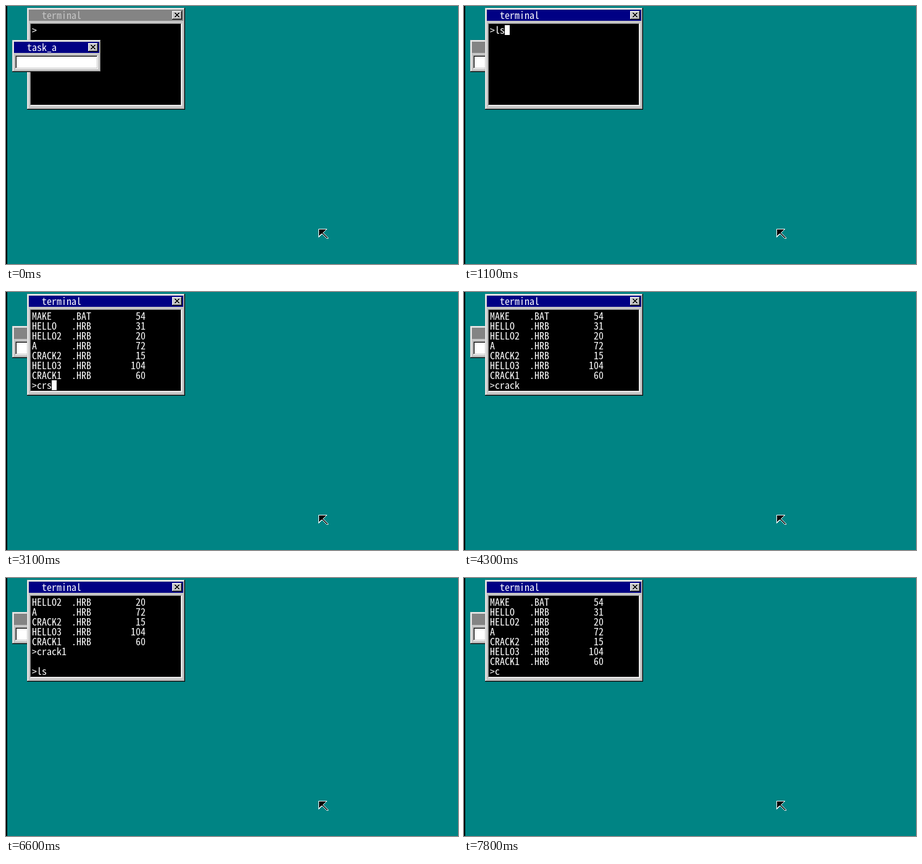
Animation of 732 by 418 pixels, one loop 8 s. Source, as an HTML page:

```html
<!DOCTYPE html>
<html lang="en">
<head>
<meta charset="utf-8">
<title>Terminal session</title>
<style>
  html, body { margin: 0; width: 100%; height: 100%; overflow: hidden; background: #008484; }
  svg { display: block; width: 732px; height: 418px; }
  text {
    font: 300 16px "Noto Sans Mono CJK JP", "Noto Sans Mono", "Liberation Mono", monospace;
    white-space: pre;
  }
</style>
</head>
<body>
<svg id="stage" viewBox="0 0 732 418" shape-rendering="crispEdges"></svg>
<script>
const NS = 'http://www.w3.org/2000/svg';
const LOOP = 8000;
const CELL = 8, LINE = 16, ROWS = 8;
const WHITE = '#fff', BLACK = '#000', LIGHT = '#c6c6c6', GREY = '#848484', NAVY = '#000084', TEAL = '#008484';
const stage = document.getElementById('stage');

function add(parent, tag, attrs) {
  const el = document.createElementNS(NS, tag);
  for (const key in attrs) el.setAttribute(key, attrs[key]);
  return parent.appendChild(el);
}

const rect = (parent, x, y, width, height, fill) => add(parent, 'rect', { x, y, width, height, fill });

// Puts every character on the fixed 8 px grid; y is the top of the line.
function write(el, x, y, str) {
  el.textContent = str;
  el.setAttribute('x', [...str].map((_, i) => x + i * CELL).join(' '));
  el.setAttribute('y', y + 14);
}

function closeButton(parent, x, y) {
  rect(parent, x, y, 16, 14, BLACK);
  rect(parent, x, y, 15, 13, WHITE);
  rect(parent, x + 1, y + 1, 14, 12, GREY);
  rect(parent, x + 1, y + 1, 13, 11, LIGHT);
  rect(parent, x + 15, y, 1, 14, BLACK);
  for (let i = 0; i < 7; i++) {
    const left = Math.min(i, 6 - i);
    rect(parent, x + 4 + left, y + 3 + i, 2, 1, BLACK);
    rect(parent, x + 10 - left, y + 3 + i, 2, 1, BLACK);
  }
}

function textBox(parent, x, y, w, h, fill) {
  rect(parent, x - 3, y - 3, w + 6, h + 6, WHITE);
  rect(parent, x - 3, y - 3, w + 5, h + 5, GREY);
  rect(parent, x - 2, y - 2, w + 4, h + 4, LIGHT);
  rect(parent, x - 2, y - 2, w + 3, h + 3, BLACK);
  rect(parent, x - 1, y - 1, w + 2, h + 2, fill);
}

function makeWindow(x, y, w, h, title) {
  const g = add(stage, 'g', { transform: `translate(${x} ${y})` });
  rect(g, 0, 0, w, h, BLACK);
  rect(g, 0, 0, w - 1, h - 1, LIGHT);
  rect(g, 1, 1, w - 2, h - 2, GREY);
  rect(g, 1, 1, w - 3, h - 3, WHITE);
  rect(g, 2, 2, w - 4, h - 4, LIGHT);
  const bar = rect(g, 3, 3, w - 6, 18, NAVY);
  const label = add(g, 'text', {});
  write(label, 24, 4, title);
  closeButton(g, w - 21, 5);
  return {
    g,
    setActive(on) {
      bar.setAttribute('fill', on ? NAVY : GREY);
      label.setAttribute('fill', on ? WHITE : LIGHT);
    }
  };
}

rect(stage, 0, 0, 732, 418, TEAL);
rect(stage, 0, 0, 2, 418, BLACK);

const terminal = makeWindow(34, 3, 256, 165, 'terminal');
textBox(terminal.g, 8, 28, 240, 128, BLACK);
const caret = rect(terminal.g, 0, 0, CELL, LINE, WHITE);
const lines = Array.from({ length: ROWS }, () => add(terminal.g, 'text', { fill: WHITE }));

const task = makeWindow(10, 55, 144, 52, 'task_a');
textBox(task.g, 8, 28, 128, 16, WHITE);

const pointer = add(stage, 'g', { transform: 'translate(506 361)' });
add(pointer, 'path', { fill: WHITE, d: 'M0 0H14V1L8 6V7L16 14V16H13L6 9H5L1 14H0Z' });
add(pointer, 'path', { fill: BLACK, d: 'M1 1H12L7 6V7L15 14V15H14L6 8H4L1 12Z' });

const files = [
  ['MAKE', 'BAT', 54], ['HELLO', 'HRB', 31], ['HELLO2', 'HRB', 20], ['A', 'HRB', 72],
  ['CRACK2', 'HRB', 15], ['HELLO3', 'HRB', 104], ['CRACK1', 'HRB', 60]
].map(([name, ext, size]) => name.padEnd(8) + '.' + ext + String(size).padStart(11));
const crashed = [...files.slice(2), '>crack1', ''];

// [start ms, lines above the prompt, typed text, caret shown]
const steps = [
  [0, [], '', 0], [900, [], 'l', 0], [1000, [], 'ls', 0], [1100, [], 'ls', 1],
  [1400, files, '', 0], [2100, files, 'c', 1], [2600, files, 'cr', 0],
  [3100, files, 'crs', 1], [3700, files, 'crs', 0], [3900, files, 'cra', 0],
  [4100, files, 'crac', 0], [4200, files, 'crac', 1], [4300, files, 'crack', 0],
  [4800, files, 'crack1', 0], [5200, files, 'crack1', 1], [5700, files, 'crack1', 0],
  [6100, crashed, '', 0], [6200, crashed, '', 1], [6500, crashed, 'l', 0], [6600, crashed, 'ls', 0],
  [6700, files, '', 0], [7200, files, '', 1], [7700, files, '', 0], [7800, files, 'c', 0]
];

function draw(t) {
  const focused = t >= 100, raised = t >= 200;
  terminal.setActive(focused);
  task.setActive(!focused);
  const top = raised ? terminal.g : task.g;
  if (pointer.previousSibling !== top) stage.insertBefore(top, pointer);

  const [, above, typed, caretOn] = steps.findLast(step => step[0] <= t);
  const shown = [...above, '>' + typed];
  lines.forEach((el, i) => write(el, 8, 28 + i * LINE, shown[i] || ''));
  caret.setAttribute('x', 8 + (typed.length + 1) * CELL);
  caret.setAttribute('y', 28 + above.length * LINE);
  caret.setAttribute('visibility', caretOn ? 'visible' : 'hidden');
}

function tick() {
  draw(performance.now() % LOOP);
  requestAnimationFrame(tick);
}
tick();
</script>
</body>
</html>
```
